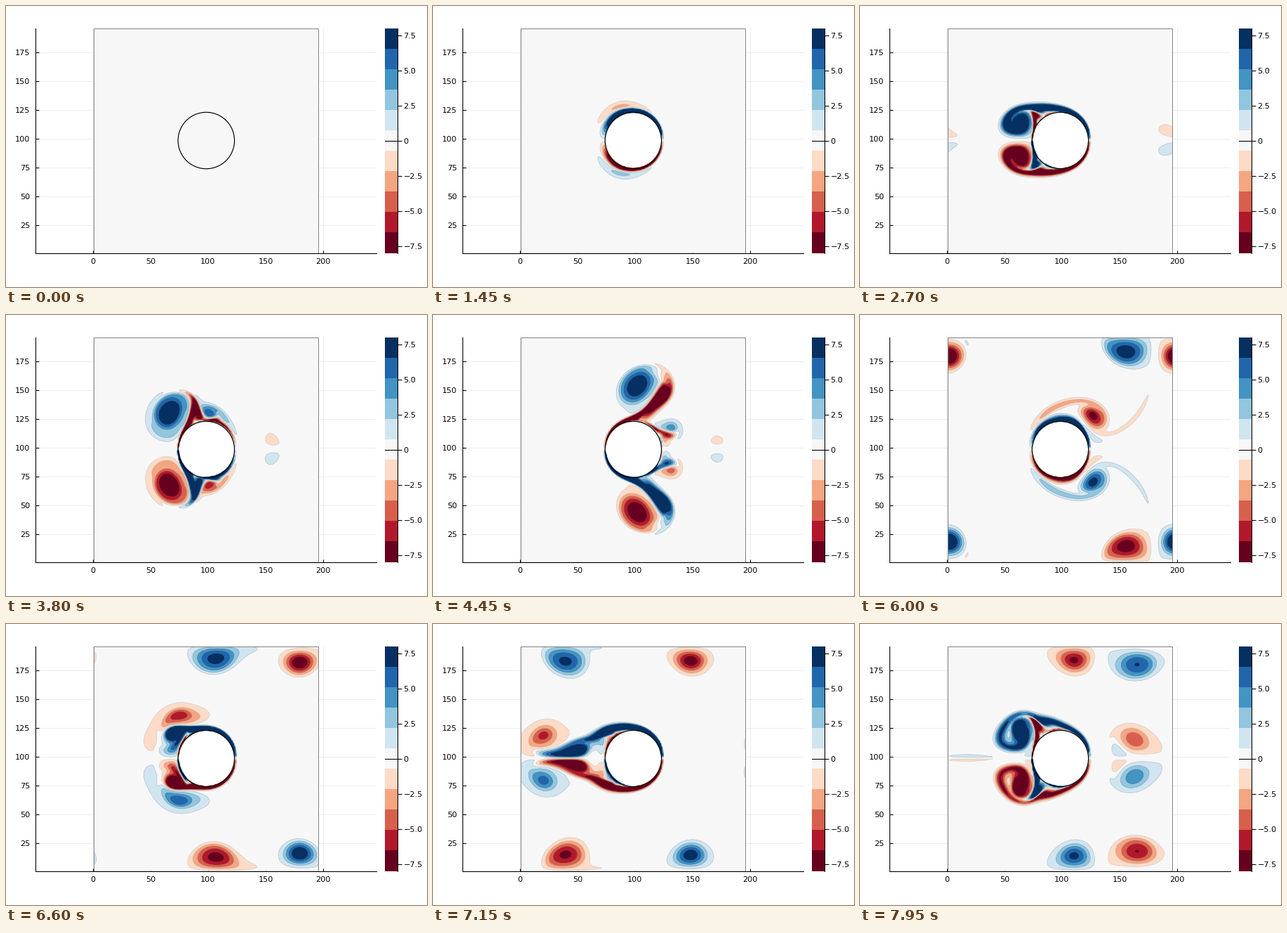
Animation of 600x400 px, one loop 8000 ms. Source, as a matplotlib script:

```python
import math

import numpy as np
import matplotlib.pyplot as plt
from matplotlib.animation import FuncAnimation
from matplotlib.colors import to_rgb
from matplotlib.patches import Circle, Rectangle

# Vorticity of an oscillating flow around a cylinder, periodic in x.
# Only the upper half is solved; the lower half is its mirror image.
FRAMES, INTERVAL = 160, 50
N, H = 196, 98          # cells along x, cells above the centre line
R = 24.5                # cylinder radius in cells
NU = R / 250            # viscosity
PERIOD = 1.5 * R        # time scale of the driving force
FRAME_TIME = 0.1 * R

COLORS = ["#67001f", "#b2182b", "#d6604d", "#f4a582", "#fddbc7", "#f7f7f7",
          "#d1e5f0", "#92c5de", "#4393c3", "#2166ac", "#053061"]
LEVELS = np.linspace(-8, 8, 12)


# ---------- flow solver ----------
kx = 2 * np.pi * np.fft.rfftfreq(N)
ky = 2 * np.pi * np.fft.fftfreq(N)
LAPLACE = 2 * np.cos(kx)[None, :] + 2 * np.cos(ky)[:, None] - 4
LAPLACE[0, 0] = 1
ZERO = np.zeros((1, N))


def body_mask(dx, dy):
    x = np.arange(N)[None, :] - N / 2 + dx
    y = np.arange(H)[:, None] + dy
    return np.clip(np.hypot(x, y) - R + 0.7, 0, 1)


MASK_U, MASK_V = body_mask(0, 0.5), body_mask(0.5, 0)


def curl(u, v):
    w = v - np.roll(v, 1, 1)
    w[1:] -= u[1:] - u[:-1]
    w[0] = 0
    return w


def velocity(w, mean):
    """Divergence-free velocity with vorticity w and the given mean flow."""
    full = np.concatenate([w, ZERO, -w[:0:-1]])
    psi = np.fft.irfft2(-np.fft.rfft2(full) / LAPLACE, s=(N, N))[:H + 1]
    u = mean + psi[1:] - psi[:-1]
    v = psi[:H] - np.roll(psi[:H], -1, 1)
    return u, v


def flux(s, q0, q1, q2, q3):
    """Limited third-order upwind flux plus diffusion between q1 and q2."""
    pos = s > 0
    far = np.where(pos, q0, q3)
    c = np.where(pos, q1, q2)
    d = np.where(pos, q2, q1)
    m = np.maximum(np.minimum(c, d),
                   np.minimum(np.maximum(c, d), 10 * c - 9 * far))
    q = (5 * c + 2 * d - far) / 6
    q = np.maximum(np.minimum(c, m), np.minimum(np.maximum(c, m), q))
    return s * q - NU * (q2 - q1)


def rate(w, a, b):
    wx = np.concatenate([w[:, -1:], w, w[:, :2]], axis=1)
    wy = np.concatenate([-w[1:2], w, ZERO, -w[-1:]])
    fx = flux(a, *(wx[:, k:k + N] for k in range(4)))
    fy = flux(b, *(wy[k:k + H] for k in range(4)))
    out = np.roll(fx, 1, 1) - fx
    out[1:] -= fy[1:] - fy[:-1]
    out[0] = 0
    return out


def step(u, v, t, dt):
    ux = u + np.roll(u, -1, 1)
    vx = v + np.roll(v, 1, 1)
    a = 0.25 * (ux + np.concatenate([ux[:1], ux[:-1]]))
    b = 0.25 * (vx + np.concatenate([vx[1:], ZERO]))

    um = u * MASK_U
    w = curl(um, v * MASK_V)
    mean = um.mean() - math.sin((t + dt / 2) / PERIOD) / R * dt
    w1 = w + dt * rate(w, a, b)
    w = 0.5 * (w + w1 + dt * rate(w1, a, b))
    return velocity(w, mean)


def simulate():
    fields = np.zeros((FRAMES, H, N), dtype=np.float32)
    u, v = np.ones((H, N)), np.zeros((H, N))
    for _ in range(20):
        um = u * MASK_U
        u, v = velocity(curl(um, v * MASK_V), um.mean())
    t = 0.0
    for k in range(1, FRAMES):
        speed = max(np.abs(u).max(), np.abs(v).max())
        n = int(min(24, max(4, math.ceil(FRAME_TIME * speed / 0.7))))
        dt = FRAME_TIME / n
        for _ in range(n):
            u, v = step(u, v, t, dt)
            t += dt
        fields[k] = R * curl(u * MASK_U, v * MASK_V)
    return fields


FIELDS = simulate()


# ---------- stage ----------
W_PX, H_PX, DPI = 600, 400, 100
PT = 72 / DPI
plt.rcParams["font.family"] = "DejaVu Sans"
plt.rcParams["axes.unicode_minus"] = True
fig = plt.figure(figsize=(W_PX / DPI, H_PX / DPI), dpi=DPI, facecolor="white")


def px_axes(left, top, right, bottom):
    return fig.add_axes([left / W_PX, 1 - bottom / H_PX,
                         (right - left) / W_PX, (bottom - top) / H_PX])


def keep_spines(axes, names):
    for name, spine in axes.spines.items():
        spine.set_visible(name in names)
        spine.set_linewidth(1.1 * PT)


ax = px_axes(42.4, 31.5, 528.4, 351.5)
half = 243 / 320 * 195
ax.set_xlim(98.5 - half, 98.5 + half)
ax.set_ylim(1, 196)
ax.set_xticks(range(0, 201, 50))
ax.set_yticks(range(25, 176, 25))
ax.set_axisbelow(True)
ax.grid(color="black", alpha=0.1, linewidth=0.5)
ax.tick_params(direction="in", length=4.5 * PT, width=1.1 * PT, labelsize=8.1)
ax.tick_params(axis="x", pad=7.5 * PT)
ax.tick_params(axis="y", pad=8 * PT)
keep_spines(ax, ("left", "bottom"))

bar = px_axes(540.3, 31.5, 558.4, 351.5)
bar.set_xlim(0, 1)
bar.set_ylim(-8, 8)
for low, high, color in zip(LEVELS, LEVELS[1:], COLORS):
    bar.add_patch(Rectangle((0, low), 1, high - low, facecolor=color,
                            linewidth=0, antialiased=False))
bar.plot([0, 1], [0, 0], color="black", linewidth=1.1 * PT)
bar.set_xticks([])
bar.yaxis.tick_right()
bar.set_yticks(np.arange(-7.5, 8, 2.5),
               ["−7.5", "−5.0", "−2.5", "0", "2.5", "5.0", "7.5"])
bar.tick_params(axis="y", direction="out", length=5.5 * PT, width=1.1 * PT,
                pad=2.5 * PT, labelsize=8.1)
keep_spines(bar, ("right",))

ax.add_patch(Rectangle((1, 1), 195, 195, fill=False, edgecolor="#808080",
                       linewidth=0.7, zorder=2))
inside = ax.add_patch(Circle((98.5, 98.5), R - 1.1, facecolor="white",
                             linewidth=0, zorder=3))
ax.add_patch(Circle((98.5, 98.5), R, fill=False, edgecolor="black",
                    linewidth=0.85, zorder=4))

GRID = np.arange(1, N + 1)
EDGES = [tuple(0.86 * c for c in to_rgb(color)) for color in COLORS]


def draw(k):
    for old in list(ax.collections):
        old.remove()
    w = FIELDS[k]
    z = np.concatenate([ZERO, -w[:0:-1], w])
    bands = ax.contourf(GRID, GRID, np.clip(z, -7.99, 7.99), levels=LEVELS,
                        colors=COLORS, antialiased=True, zorder=1)
    bands.set_edgecolor(EDGES)
    bands.set_linewidth(0.45)
    inside.set_visible(k > 0)
    return [bands, inside]


anim = FuncAnimation(fig, draw, frames=FRAMES, interval=INTERVAL, repeat=True,
                     cache_frame_data=False)
plt.show()
```
